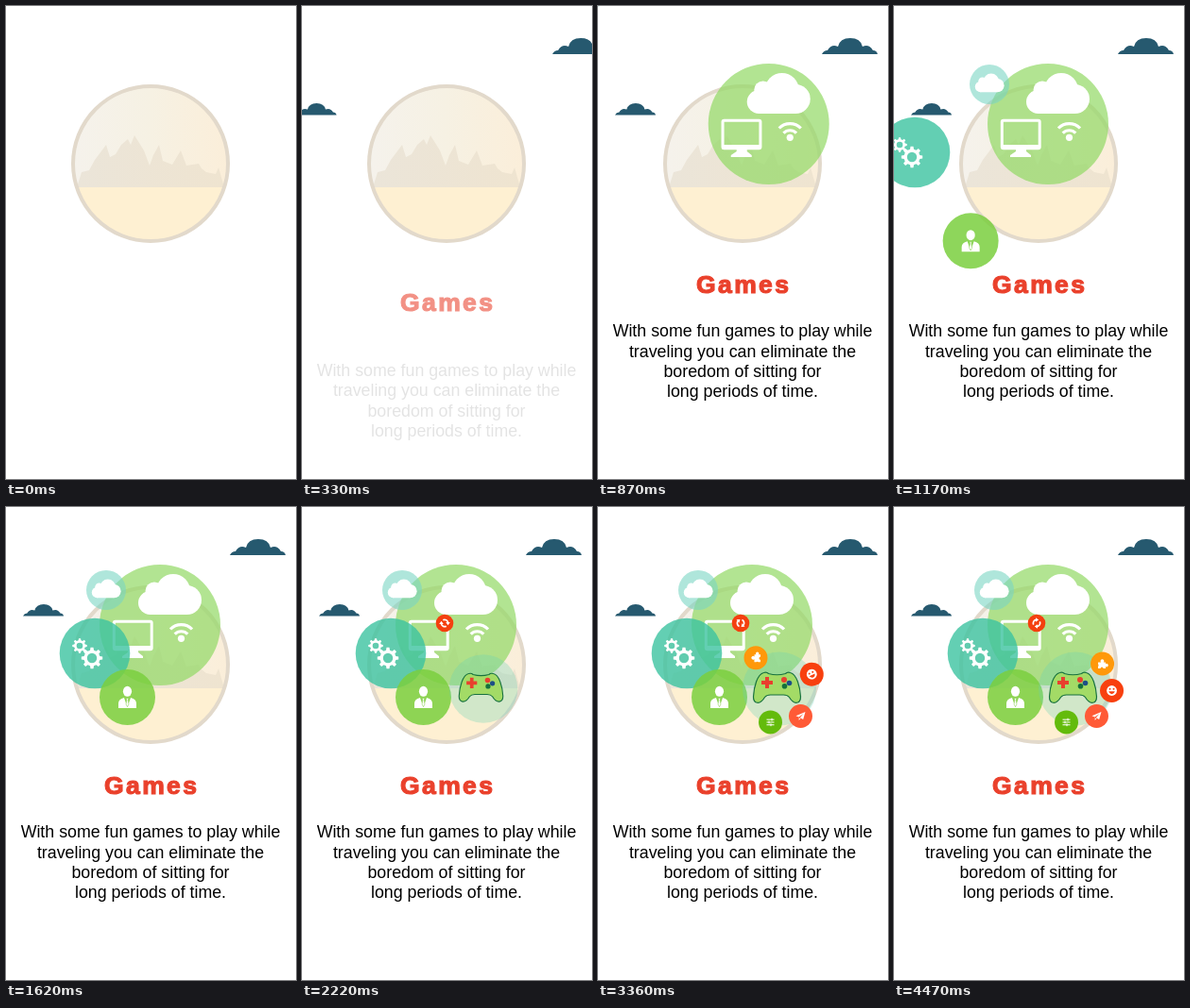
Animation of 307x501 px, one loop 4500 ms. Source, as an HTML page:

```html
<!DOCTYPE html>
<html lang="en">
<head>
<meta charset="utf-8">
<title>Games</title>
<style>
html, body { margin: 0; width: 100%; height: 100%; overflow: hidden; background: #fff; }
svg { display: block; width: 100vw; height: 100vh; }
text { font-family: "Liberation Sans", Arial, sans-serif; text-anchor: middle; }
#title { font-size: 26.5px; font-weight: 700; letter-spacing: 2.4px; fill: #ea412c; stroke: #ea412c; stroke-width: 1.2; }
#body { font-size: 17.8px; }
.w { fill: #fff; }
.l { fill: none; stroke: #fff; }
</style>
</head>
<body>
<svg viewBox="0 0 307 501">
  <defs>
    <linearGradient id="sky">
      <stop offset="0" stop-color="#f5f2ec"/>
      <stop offset=".5" stop-color="#f6f1e3"/>
      <stop offset="1" stop-color="#fbeed9"/>
    </linearGradient>
    <linearGradient id="rock">
      <stop offset="0" stop-color="#ebe5d9"/>
      <stop offset="1" stop-color="#efe4d0"/>
    </linearGradient>
    <clipPath id="disc"><circle cx="153" cy="167" r="82"/></clipPath>
    <path id="puff" d="M0 17Q2 13 6 13Q10 6 17 9Q19 0 30 0Q41 0 43 9Q50 6 54 13Q58 13 59 17Z"/>
    <g id="cloud" class="w">
      <circle cx="12.5" cy="30.5" r="12.5"/>
      <circle cx="17" cy="18" r="9.5"/>
      <circle cx="37" cy="18" r="18"/>
      <circle cx="51.5" cy="27.5" r="15.5"/>
      <path d="M12 20H51V43H12Z"/>
    </g>
  </defs>

  <g clip-path="url(#disc)">
    <path fill="url(#sky)" d="M69 83H237V192H69Z"/>
    <path fill="#fef0d2" d="M69 192H237V251H69Z"/>
    <path fill="url(#rock)" d="M75 192L80 176L88 174L94 163L106 147L110 160L116 157L122 147L129 141L132 147L136 137L146 153L152 169L156 158L162 147L166 164L176 168L185 153L191 169L204 167L207 172L212 176L222 178L225 171L231 192Z"/>
  </g>
  <circle cx="153" cy="167" r="82" fill="none" stroke="#e2d9cb" stroke-width="4"/>

  <g id="puffL" fill="#26596f"><use href="#puff" transform="translate(18 103) scale(.73)"/></g>
  <g id="puffR" fill="#26596f"><use href="#puff" transform="translate(237 34)"/></g>

  <g id="web">
    <circle cx="163" cy="125" r="64" fill="#95da69" opacity=".72"/>
    <use href="#cloud" x="140" y="71"/>
    <rect class="l" x="114.3" y="121.3" width="39.9" height="29.4" rx="1.5" stroke-width="3"/>
    <path class="w" d="M114 147H154V152H114ZM129 152H140V154L145 158V160H123V158L129 154Z"/>
    <circle class="w" cx="185.5" cy="139.3" r="3.6"/>
    <path class="l" stroke-width="3.2" d="M174 129.5A16 16 0 0 1 197 129.5M178.7 134.6A9.5 9.5 0 0 1 192.3 134.6"/>
  </g>
  <g id="gears">
    <circle cx="94" cy="155" r="37.3" fill="#3cc4a1" opacity=".8"/>
    <g id="cogs" class="w" fill-rule="evenodd"></g>
  </g>
  <g id="sky2">
    <circle cx="106" cy="88" r="21" fill="#7bd5c3" opacity=".6"/>
    <use href="#cloud" transform="translate(90.8 76.5) scale(.46)"/>
  </g>
  <g id="user">
    <circle cx="128.5" cy="201.5" r="29.5" fill="#7bcf3f" opacity=".85"/>
    <ellipse class="w" cx="128.5" cy="195.3" rx="4.6" ry="5.5"/>
    <path class="w" d="M119 213V208Q119 203.500 125 202L128.500 212L132 202Q138 203.500 138 208V213Z"/>
    <path class="w" d="M127.300 202.500H129.700L129.200 204.500L130 209L128.500 211.500L127 209L127.800 204.500Z" stroke="#84cd4c" stroke-width=".5"/>
  </g>

  <g id="halo"><circle r="39" fill="#69d2b4" opacity=".3"/></g>
  <g id="pad">
    <path fill="#a3db66" stroke="#17713f" stroke-width="1.2" d="M-14 -15.500Q-11 -16.500 -9 -14.500Q0 -12 9 -14.500Q11 -16.500 14 -15.500C21 -14 24.500 0 25 10C25 17.500 18 19 13 10.500Q11 8 7 8H-7Q-11 8 -13 10.500C-18 19 -25 17.500 -25 10C-24.500 0 -21 -14 -14 -15.500Z"/>
    <path stroke="#e8402e" stroke-width="4" d="M-16.500 -5H-4.500M-10.500 -11V1"/>
    <circle cx="7.500" cy="-8" r="3" fill="#e8402e"/>
    <circle cx="13" cy="-4.500" r="2.800" fill="#1d4f86"/>
    <circle cx="8" cy="-1.200" r="2.800" fill="#15713c"/>
  </g>

  <g id="sync">
    <circle r="9.300" fill="#f4400f"/>
    <g id="arrows">
      <path class="l" stroke-width="1.700" d="M-3.300 1.700A3.700 3.700 0 0 1 -.5 -3.600M3.300 -1.700A3.700 3.700 0 0 1 .5 3.600"/>
      <path class="w" d="M-1 -5.800L2.200 -3.500L-1 -1.200ZM1 5.800L-2.200 3.500L1 1.200Z"/>
    </g>
  </g>

  <g id="list">
    <circle r="12.500" fill="#63bb0c"/>
    <path class="l" stroke-width="1" d="M-4 -2.800H4M-4 0H4M-4 2.800H4M1.500 -4.200V-1.400M-1.500 -1.400V1.400M.5 1.400V4.200"/>
  </g>
  <g id="plane">
    <circle r="12.500" fill="#ff5a36"/>
    <path class="w" d="M5 -4.500L-5 -.2L-2 1L3 -2.500L-.7 1.800L2.700 3.500ZM-1.800 1.800V4.500L-.2 2.700Z"/>
  </g>
  <g id="smile">
    <circle r="12.500" fill="#f8400f"/>
    <circle class="w" r="5.400"/>
    <path fill="#f8400f" d="M-3.300 .8H3.300Q2.500 3.700 0 3.700Q-2.500 3.700 -3.300 .8Z"/>
    <circle cx="-2" cy="-1.700" r="1" fill="#f8400f"/>
    <circle cx="2" cy="-1.700" r="1" fill="#f8400f"/>
  </g>
  <g id="piece">
    <circle r="12.500" fill="#ff980a"/>
    <path class="w" d="M-4.500 -1.500H-1.500A1.900 1.900 0 1 1 1.300 -1.500H3.500V.3A1.700 1.700 0 1 1 3.500 3V5H1A1.500 1.500 0 0 0 -2 5H-4.500V2.700A1.500 1.500 0 0 0 -4.500 .5Z"/>
  </g>

  <text id="title" x="154.200" y="303.500">Games</text>
  <g id="body">
    <text x="153" y="350">With some fun games to play while</text>
    <text x="153" y="371.500">traveling you can eliminate the</text>
    <text x="153" y="393">boredom of sitting for</text>
    <text x="153" y="414">long periods of time.</text>
  </g>
</svg>
<script>
const LOOP = 4500, STEP = 30;
const $ = id => document.getElementById(id);
const part = (t, start, len) => Math.min(1, Math.max(0, (t - start) / len));
// share of the way still to go, easing out
const left = (t, start, len) => (1 - part(t, start, len)) ** 2;
const put = (id, tf, alpha = 1) => {
  $(id).setAttribute('transform', tf);
  $(id).setAttribute('opacity', alpha);
};

function cog(cx, cy, r, hole, teeth) {
  let d = '';
  for (let i = 0; i < teeth; i++) {
    [[-.3, .76], [-.17, 1], [.17, 1], [.3, .76]].forEach(([o, k]) => {
      const a = (i + o) / teeth * 2 * Math.PI;
      d += `${d ? 'L' : 'M'}${cx + r * k * Math.cos(a)} ${cy + r * k * Math.sin(a)}`;
    });
  }
  return `<path d="${d}ZM${cx - hole} ${cy}a${hole} ${hole} 0 1 0 ${2 * hole} 0a${hole} ${hole} 0 1 0 ${-2 * hole} 0Z"/>`;
}
$('cogs').innerHTML = cog(91, 160, 11.3, 5.2, 8) + cog(78, 147, 7.8, 3.3, 8);

// id, offset x, offset y, start, duration
const slides = [
  ['puffL', -61, 0, 110, 600],
  ['puffR', 70, 0, 110, 600],
  ['web', 208, 0, 516, 500],
  ['sky2', -109, -109, 869, 383],
  ['user', -140, 140, 875, 705],
  ['gears', -131, 0, 1013, 607]
];

// id, last angle, radius, inward dip, start, duration
const orbit = { x: 191, y: 190, from: -170 };
const badges = [
  ['list', 102.6, 38.9, 10, 2490, 600],
  ['plane', 53.3, 39.3, 1, 2682, 600],
  ['smile', 6.5, 39.8, 5, 2850, 600],
  ['piece', -39.1, 38.1, 0, 3255, 510]
];

function pop(t, start, rise, fall, peak) {
  return peak * part(t, start, rise) - (peak - 1) * part(t, start + rise, fall);
}

function draw(t) {
  for (const [id, dx, dy, start, len] of slides) {
    const k = left(t, start, len);
    put(id, `translate(${dx * k} ${dy * k})`, t < start ? 0 : 1);
  }
  for (const [id, start] of [['title', 120], ['body', 297]]) {
    const k = left(t, start, 600);
    put(id, `translate(0 ${47 * k})`, 1 - k);
  }

  const s = pop(t, 1910, 473, 240, 1.42);
  put('halo', `translate(192 192.500) scale(${s})`, s > 0 ? 1 : 0);
  put('pad', `translate(189.500 191) scale(${s})`, s > 0 ? 1 : 0);

  const b = pop(t, 1650, 180, 90, 1.1);
  put('sync', `translate(151 123) scale(${b})`, b > 0 ? 1 : 0);
  put('arrows', `rotate(${(t - 4470) * .36})`);

  for (const [id, end, r, dip, start, len] of badges) {
    let p = part(t, start, len);
    if (id === 'piece') p = Math.sin(p * Math.PI / 2);
    const turn = (orbit.from - end) * (1 - p);
    const a = (end + turn) * Math.PI / 180;
    const rad = r + 25 * Math.exp(-11 * p) * (1 - p) - dip * Math.sin(Math.PI * p);
    const x = orbit.x + rad * Math.cos(a), y = orbit.y + rad * Math.sin(a);
    put(id, `translate(${x} ${y}) rotate(${turn})`, Math.min(1, p * 10));
  }
}

const t0 = performance.now();
function tick(now) {
  const t = Math.max(0, now - t0) % LOOP;
  draw(Math.floor(t / STEP) * STEP);
  requestAnimationFrame(tick);
}
draw(0);
requestAnimationFrame(tick);
</script>
</body>
</html>
```
